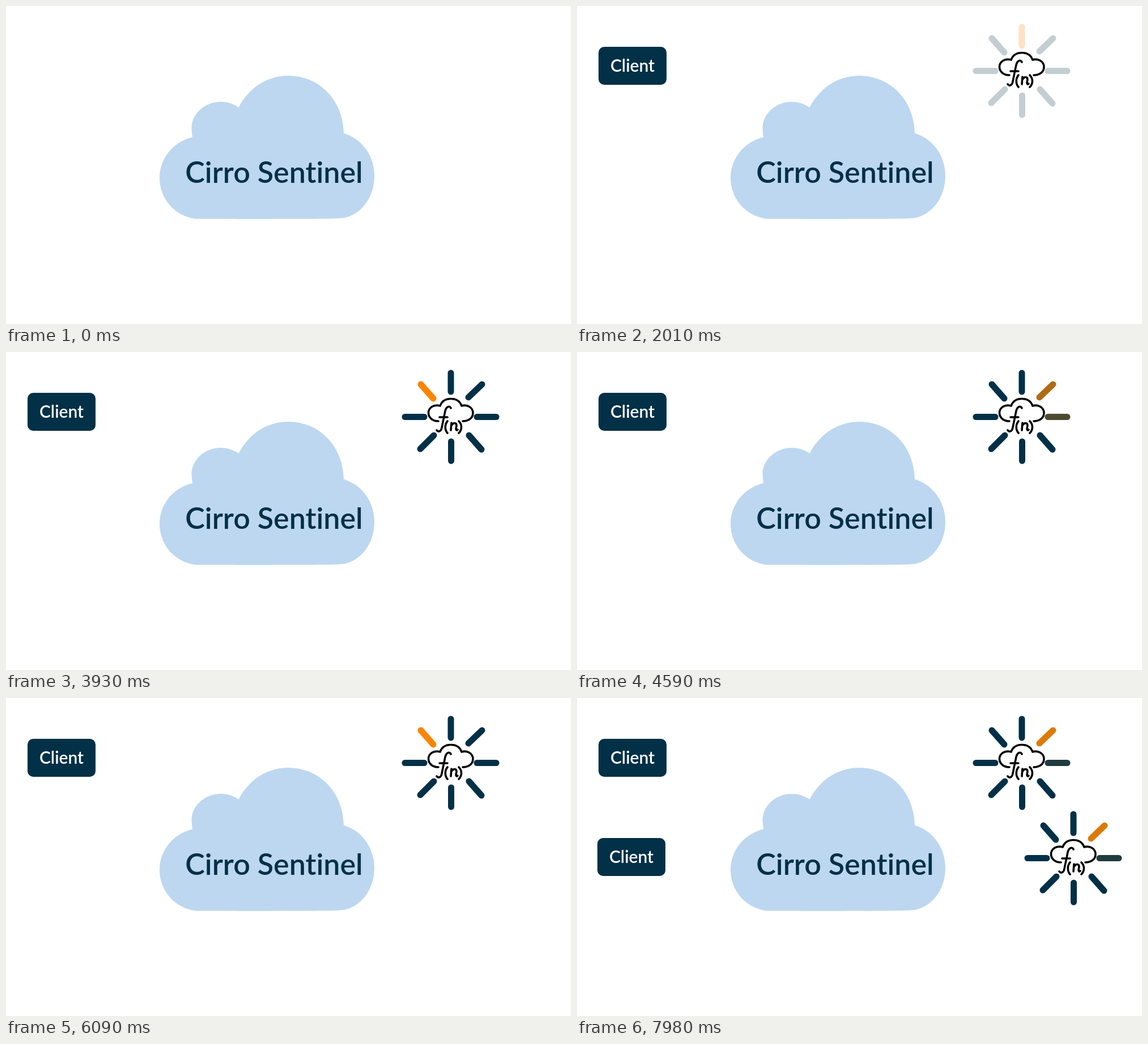
Write an HTML page that moves like this. It is 997 px wide and 561 px high and loops after 8000 ms.

```html
<!DOCTYPE html>
<html lang="en">
<head>
<meta charset="utf-8">
<title>Cloud functions</title>
<style>
  html, body { margin: 0; width: 100%; height: 100%; overflow: hidden; background: #fff; }
  svg { display: block; width: 997px; height: 561px; }
  text {
    font-family: Lato, "Open Sans", sans-serif; font-weight: 600;
    font-variant-ligatures: none; text-anchor: middle;
  }
  .client text { font-size: 30px; fill: #fff; }
  .icon { fill: none; stroke: #000; stroke-width: 3.6; stroke-linecap: round; stroke-linejoin: round; }
  .rays { stroke-width: 11; stroke-linecap: round; }
</style>
</head>
<body>
<svg id="stage" viewBox="0 0 997 561">
  <path fill="#bdd7f0" d="M335 375.5C295 370 271 338 271 303C271 268 296 239 329 231.5
    C328 225 327.5 220 327.5 214C328 190 351 169 379 169C391 169 402 173 410.5 179
    C428 145 460 123 498 123C552 123 595 165 596 224.5C628 234 650 264 650 300
    C650 338 626 369 595 374C575 376.5 400 375.5 335 375.5Z"/>
  <text x="473" y="312" font-size="52" fill="#023047">Cirro Sentinel</text>
</svg>
<script>
const LOOP = 8000, FRAME = 30, STEP = 270;
const NAVY = [2, 48, 71], ORANGE = [251, 133, 0];
const navy = `rgb(${NAVY})`;
const stage = document.getElementById('stage');

const ICON = `M763 122C752 122 745.5 115 745.5 107.5C745.5 98 755 92 766 95C769 87 776 82.5 785 82.5
  C794 82.5 801 87 804 95C814 92 824 98 824 107.5C824 116 817 122 806 122
  M785 99C783 94 777 96 775 104L769 133C768 140 763 142 760 138M765 115H779
  M779 122C774 128 774 137 779 143M799 122C805 128 805 137 799 143
  M786 125L785 138M786 130C789 124 795 124 795 130L794 135C794 138 796 139 797 137`;

// Clockwise from the top
const RAYS = ['M785 37V70', 'M840 57L816 80', 'M831 114.5H865', 'M817 147L839 172',
  'M785.5 158V192', 'M755 147L731 171', 'M704 114.5H738', 'M732 57L754 82'];

const clamp = v => Math.min(1, Math.max(0, v));
const ramp = (t, from, to) => clamp((t - from) / (to - from));
const mix = k => `rgb(${NAVY.map((c, i) => Math.round(c + (ORANGE[i] - c) * k))})`;

function add(parent, tag, attrs = {}) {
  const el = document.createElementNS(stage.namespaceURI, tag);
  for (const name in attrs) el.setAttribute(name, attrs[name]);
  parent.append(el);
  return el;
}

function fade(el, start, end) {
  return t => el.setAttribute('opacity', ramp(t, start, end));
}

function client(x, y, start, end) {
  const g = add(stage, 'g', { class: 'client', transform: `translate(${x} ${y})` });
  add(g, 'rect', { width: 120, height: 67, rx: 10, fill: navy });
  add(g, 'text', { x: 60, y: 44 }).textContent = 'Client';
  return fade(g, start, end);
}

// An arrow wiped in and out from the left
function arrow(id, x1, y1, x2, y2, [in0, in1, out0, out1]) {
  const clip = add(add(stage, 'clipPath', { id }), 'rect', { y: 0, height: 561 });
  const length = Math.hypot(x2 - x1, y2 - y1);
  const angle = Math.atan2(y2 - y1, x2 - x1) * 180 / Math.PI;
  const outer = add(stage, 'g', { 'clip-path': `url(#${id})` });
  add(outer, 'path', {
    transform: `translate(${x1} ${y1}) rotate(${angle})`, fill: navy,
    d: `M0 -2H${length - 14}V-7L${length} 0L${length - 14} 7V2H0Z`
  });
  const left = x1 - 4, width = x2 - x1 + 8;
  return t => {
    const a = ramp(t, out0, out1), b = ramp(t, in0, in1);
    clip.setAttribute('x', left + width * a);
    clip.setAttribute('width', width * Math.max(0, b - a));
  };
}

// Brightness of ray i: one light travels round, pausing on each ray
function lit(i, t) {
  const second = t >= 7320;
  const since = Math.max(0, t - (second ? 7625 : 2040));
  const n = Math.floor(since / STEP);
  const pass = ramp(since % STEP, 60, 260);
  if (n > 15) return 0;
  if (i === n % 8) return (1 - pass) * (second ? ramp(t, 7320, 7530) : 1);
  return i === (n + 1) % 8 && n < 15 ? pass : 0;
}

function func(dx, dy, start, end, glow) {
  const g = add(stage, 'g', { transform: `translate(${dx} ${dy})` });
  const rays = add(g, 'g', { class: 'rays' });
  const lines = RAYS.map(d => add(rays, 'path', { d }));
  const showIcon = fade(add(g, 'path', { class: 'icon', d: ICON }), start, end);
  const showRays = fade(rays, glow, glow + 130);
  return t => {
    showIcon(t);
    showRays(t);
    lines.forEach((line, i) => line.setAttribute('stroke', mix(lit(i, t))));
  };
}

const parts = [
  client(38, 72, 0, 360),
  arrow('a1', 165, 108, 330, 182, [360, 690, 720, 900]),
  arrow('a2', 602, 184, 741, 122, [900, 1230, 1620, 1800]),
  func(0, 0, 1230, 1560, 1980),
  client(36, 247, 6120, 6480),
  arrow('a3', 163, 281, 266, 289, [6480, 6810, 6840, 7020]),
  arrow('a4', 657, 290, 833, 283, [7020, 7290, 7650, 7830]),
  func(91, 168, 7290, 7530, 7650)
];

const begin = performance.now();
function draw() {
  const now = (performance.now() - begin) % LOOP;
  const t = Math.floor(now / FRAME) * FRAME;
  parts.forEach(part => part(t));
  requestAnimationFrame(draw);
}
draw();
</script>
</body>
</html>
```
